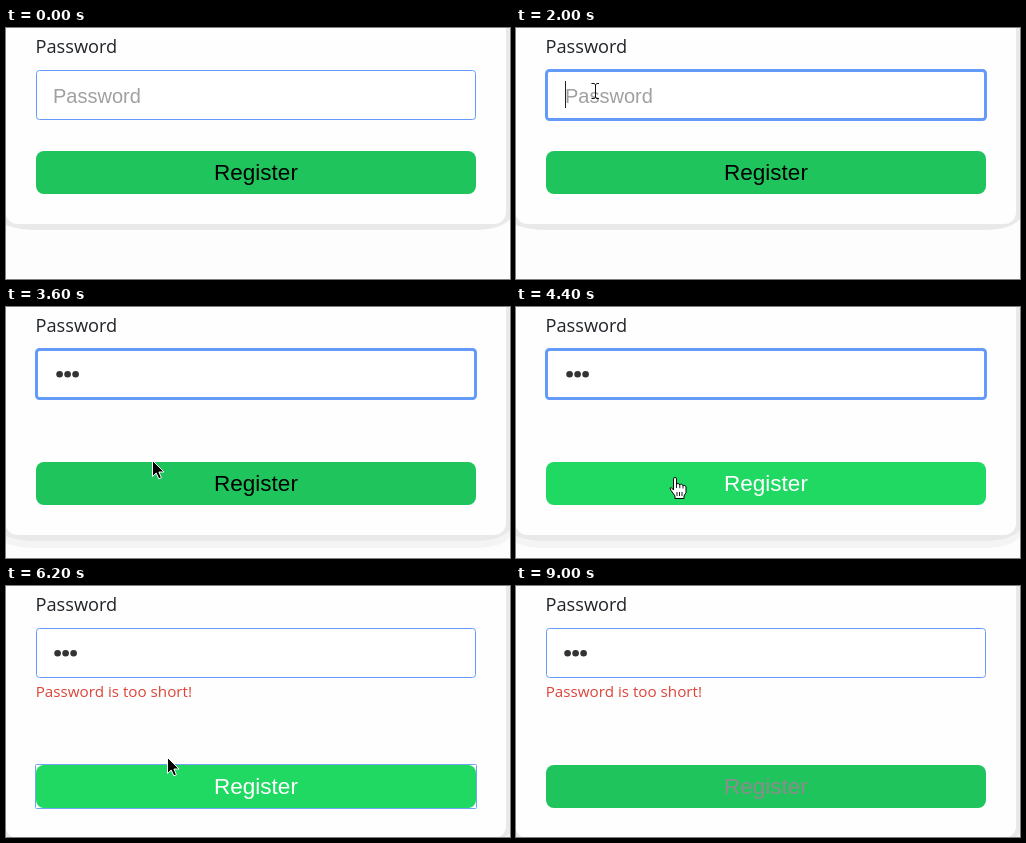
An HTML page that plays this animation: 504x251 px, repeating every 9.1 s.

```html
<!DOCTYPE html>
<html lang="en">
<head>
<meta charset="utf-8">
<title>Password form</title>
<style>
  html, body { margin: 0; width: 100%; height: 100%; overflow: hidden; background: #fdfdfd; }
  svg { display: block; }
  .label { font-family: "Open Sans", "Noto Sans", sans-serif; }
  .field { font-family: "Liberation Sans", Arial, sans-serif; }
</style>
</head>
<body>
<svg width="504" height="251" viewBox="0 0 504 251">
  <path id="halo" fill="#f4f4f4"/>
  <path id="shadow" fill="#e9e9e9"/>
  <rect id="card" x="-0.5" y="-30" width="500.5" rx="12" fill="#fefefe"/>

  <text class="label" x="29.5" y="25" font-size="18.2" fill="#212529">Password</text>
  <rect id="input" x="30.5" y="42.5" width="439" height="49" rx="3" fill="#fff" stroke="#659bf8"/>
  <g id="value">
    <text id="hint" class="field" x="47" y="75" font-size="20" fill="#a0a0a0">Password</text>
    <g id="dots" fill="#333">
      <circle cx="51.6" cy="67.3" r="3.3"/>
      <circle cx="59.6" cy="67.3" r="3.3"/>
      <circle cx="67.6" cy="67.3" r="3.3"/>
    </g>
  </g>
  <rect id="caret" y="53" width="1" height="27" fill="#222"/>
  <text id="error" class="label" x="29.7" y="111" font-size="15.2" fill="#dc4438">Password is too short!</text>

  <g id="button">
    <rect id="face" x="30" width="440" height="43" rx="8"/>
    <rect id="ring" x="29.5" y="-0.5" width="441" height="44" rx="1" fill="none" stroke="#71a5f3"/>
    <text id="caption" class="field" x="250" y="29" font-size="22.5" text-anchor="middle">Register</text>
  </g>

  <g id="arrow">
    <path d="M.5.5V16.5L4.2 13 6.8 18.8 9.4 17.7 6.9 12H12Z" fill="#000" stroke="#fff"/>
  </g>
  <g id="beam" fill="none" stroke="#111">
    <path d="M-3.5-7.5H-1L.5-6.5 2-7.5H4M.5-6.5V6.5M-3.5 7.5H-1L.5 6.5 2 7.5H4"/>
  </g>
  <g id="hand">
    <path d="M-1.5 13V1.8Q-1.5.5 0 .5T1.5 1.8V7.5Q1.8 6.4 3.2 6.6T4.8 8Q5.3 7 6.6 7.3T8 8.8Q8.7 8 9.8 8.5T11 10V15.5L9 19V21.5H0V19L-3.8 13.7Q-5.4 11.5-4.6 10.7T-1.5 13Z" fill="#fff" stroke="#000"/>
    <path d="M1.5 7.5V11M4.8 8V11.2M8 8.8V11.5M2 15V19M4.5 15V19M7 15V19" fill="none" stroke="#000" stroke-width=".9"/>
  </g>
</svg>
<script>
const LOOP = 9100, STEP = 100;
const el = Object.fromEntries([...document.querySelectorAll('[id]')].map(n => [n.id, n]));

// Each row: start time, then the value held until the next row.
const pointer = [
  [0, ''],
  [400, 'arrow', 200, 4], [500, 'arrow', 184, 22], [600, 'beam', 162, 70],
  [700, 'arrow', 134, 117], [800, 'arrow', 110, 102], [900, 'beam', 90, 76],
  [1000, 'beam', 79, 63], [2400, ''],
  [3000, 'beam', 79, 63], [3100, 'beam', 83, 71], [3200, 'beam', 91, 82],
  [3300, 'arrow', 103, 98], [3400, 'arrow', 118, 116], [3500, 'arrow', 134, 136],
  [3600, 'arrow', 146, 153], [3700, 'hand', 154, 163], [3900, 'hand', 158, 168],
  [4000, 'hand', 159, 170], [4700, 'hand', 160, 169], [4800, 'hand', 161, 169],
  [4900, 'hand', 161, 170],
  [6200, 'arrow', 161, 171], [7700, 'arrow', 165, 150], [7800, 'arrow', 174, 116],
  [7900, 'beam', 186, 76], [8000, 'arrow', 199, 34], [8100, 'arrow', 211, 1], [8200, '']
];
const border = [[0, 1], [1100, 3], [6000, 2], [6100, 1]];
const typed = [[0, 0], [2400, 1], [2600, 2], [2800, 3]];
const caretOn = [[0, 0], [1100, 1], [1500, 0], [2000, 1], [3400, 0], [3900, 1],
  [4400, 0], [4900, 1], [5400, 0], [5900, 1], [6000, 0]];
const shift = [[0, 0], [2400, 32], [6100, 56]];
const ring = [[0, 0], [6000, 1], [8900, 0]];
const face = [[0, '#1fc55c'], [3700, '#1fd962'], [8900, '#1fcf5f'], [9000, '#1fc55c']];
const ink = [[0, '#000'], [3700, '#444'], [3900, '#bbb'], [4000, '#fff'],
  [8900, '#c4c4c4'], [9000, '#8c8c8c']];

const row = (table, t) => table.findLast(r => r[0] <= t);
const at = (table, t) => row(table, t)[1];
const show = (node, on) => { node.style.display = on ? '' : 'none'; };
const set = (node, name, value) => node.setAttribute(name, value);

// Shadow outline below a card whose bottom edge is at y.
const skirt = (y, drop) =>
  `M0 0V${y + drop - 5}Q12 ${y + drop} 32 ${y + drop}H468Q494 ${y + drop} 504 ${y + drop - 11}V0Z`;

function render(time) {
  const t = Math.floor(time % LOOP / STEP) * STEP;
  const dy = at(shift, t), bottom = 196 + dy;
  const width = at(border, t), count = at(typed, t);

  set(el.card, 'height', bottom + 30);
  set(el.shadow, 'd', skirt(bottom, 6));
  set(el.halo, 'd', skirt(bottom, 13));
  show(el.halo, dy > 0);

  const inset = width - 1;
  set(el.input, 'stroke-width', width);
  set(el.value, 'transform', `translate(${inset})`);
  show(el.hint, count === 0);
  [...el.dots.children].forEach((dot, i) => show(dot, i < count));
  set(el.caret, 'x', 49 + count * 8);
  show(el.caret, at(caretOn, t));
  show(el.error, dy > 32);

  set(el.button, 'transform', `translate(0 ${123 + dy})`);
  set(el.face, 'fill', at(face, t));
  set(el.caption, 'fill', at(ink, t));
  show(el.ring, at(ring, t));

  const [, kind, x, y] = row(pointer, t);
  for (const name of ['arrow', 'beam', 'hand']) show(el[name], name === kind);
  if (kind) set(el[kind], 'transform', `translate(${x} ${y})`);
}

const start = performance.now();
function tick() {
  render(performance.now() - start);
  requestAnimationFrame(tick);
}
tick();
</script>
</body>
</html>
```
